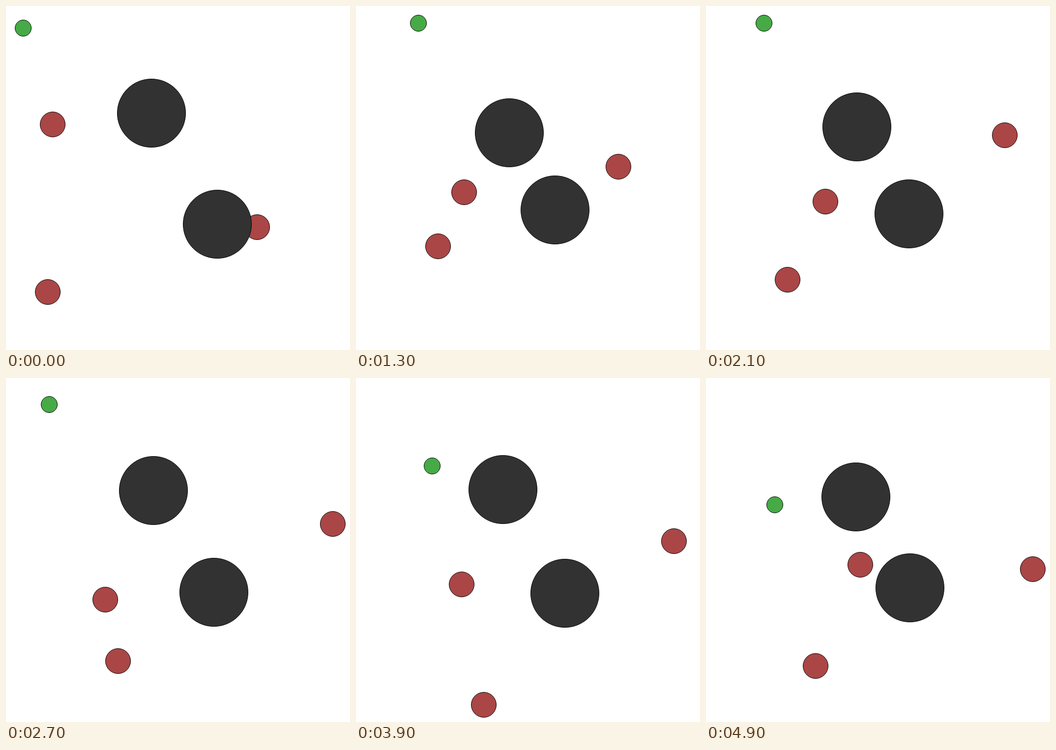
Recreate the animation shown at these times as an HTML page with a canvas. Size 700 by 700 pixels, loop 5 s.

```html
<!DOCTYPE html>
<html lang="en">
<head>
<meta charset="utf-8">
<title>Drifting balls</title>
<style>
  html, body { margin: 0; height: 100%; overflow: hidden; background: #fff; }
  canvas { display: block; }
</style>
</head>
<body>
<canvas width="700" height="700"></canvas>
<script>
const ctx = document.querySelector('canvas').getContext('2d');
const LOOP = 5000, STEP = 100, WALL = 35;
const GREEN = '#46aa46', RED = '#aa4646', DARK = '#323232';

// Every curve passes its key values at these steps; values beyond a wall press the ball against it.
const keys = [0, 6, 13, 21, 32, 39, 45, 49];
const balls = [
  { r: 25.5, color: RED,
    x: [95, 135, 220, 243, 173, 215, 272, 314], y: [241, 290, 379, 398, 482, 420, 396, 380] },
  { r: 25.5, color: RED,
    x: [85, 118, 167, 166, 277, 260, 237, 223], y: [582, 523, 489, 557, 595, 675, 585, 586] },
  { r: 25.5, color: RED,
    x: [511, 521, 534, 608, 710, 647, 690, 680], y: [450, 397, 327, 263, 332, 332, 364, 389] },
  { r: 16.5, color: GREEN,
    x: [35, 80, 127, 118, 77, 155, 116, 140], y: [45, 30, 30, 35, 84, 179, 230, 258] }
];
// How far the two big balls have closed in on each other
const closing = [0, 0.85, 1, 0.7, -0.02, 0.215, 0.72, 0.59];

// Smooth curve through the key values
function curve(v, n) {
  const last = keys.length - 1;
  const i = Math.max(1, keys.findIndex(k => k >= n));
  const slope = j => {
    const a = Math.max(0, j - 1), b = Math.min(last, j + 1);
    return (v[b] - v[a]) / (keys[b] - keys[a]);
  };
  const span = keys[i] - keys[i - 1], t = (n - keys[i - 1]) / span, s = 1 - t;
  return v[i - 1] * s * s * (1 + 2 * t) + v[i] * t * t * (1 + 2 * s)
    + span * s * t * (s * slope(i - 1) - t * slope(i));
}

const inside = p => Math.min(700 - WALL, Math.max(WALL, p));

function circle(x, y, r, color) {
  ctx.beginPath();
  ctx.arc(Math.round(x), Math.round(y), r, 0, Math.PI * 2);
  ctx.fillStyle = color;
  ctx.fill();
  ctx.stroke();
}

function draw(n) {
  ctx.clearRect(0, 0, 700, 700);
  for (const { x, y, r, color } of balls)
    circle(inside(curve(x, n)), inside(curve(y, n)), r, color);
  const u = curve(closing, n);
  circle(296 + 16 * u, 218 + 40 * u, 69.5, DARK);
  circle(430 - 25 * u, 444 - 29.4 * u, 69.5, DARK);
}

const start = performance.now();
function tick() {
  draw(Math.floor((performance.now() - start) % LOOP / STEP));
  requestAnimationFrame(tick);
}
tick();
</script>
</body>
</html>
```
